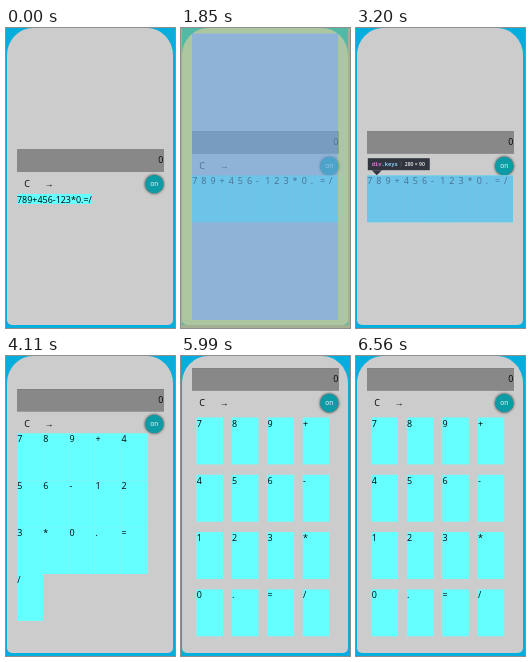
Animation of 169 by 300 pixels, one loop 7.15 s. Source, as an HTML page:

```html
<!DOCTYPE html>
<html lang="en">
<head>
<meta charset="utf-8">
<title>Calculator grid layout</title>
<style>
  html, body { margin: 0; width: 100%; height: 100%; overflow: hidden; background: #05aedd; }
  svg { display: block; width: 100%; height: 100%; }
  text { font: 8.95px "Open Sans", "Noto Sans", sans-serif; fill: #000; white-space: pre; }
  .on { font-size: 6.6px; fill: #fff; text-anchor: middle; }
  .knob { fill: #0d9ca5; filter: drop-shadow(0 0 1.6px #222); }
  .screen { fill: #888; filter: drop-shadow(.5px .9px .6px #444); }
  .key { fill: #6ff; }
  .content { fill: rgba(111, 168, 220, .66); }
  .padding { fill: rgba(147, 196, 125, .55); }
  .margin { fill: rgba(246, 178, 107, .66); }
  .tip { fill: #31353f; }
  .name { font: bold 5.4px "Noto Sans Mono", "DejaVu Sans Mono", monospace; fill: #e673e0; }
  .name tspan { fill: #8ccdf0; }
  .size { font-size: 5.1px; font-weight: 600; fill: #f2f2f2; }
</style>
</head>
<body>
<svg viewBox="0 0 169 300" preserveAspectRatio="none">
  <path fill="#ccc" d="M1 27A26 27 0 0 1 27 0H141A26 27 0 0 1 167 27V292A5 5 0 0 1 162 297H6A5 5 0 0 1 1 292Z"/>
  <g id="head">
    <rect class="screen" x="11" y="0" width="147" height="22"/>
    <text x="157.3" y="13.7" text-anchor="end">0</text>
    <text x="18.3" y="37.7">C</text>
    <text x="38.8" y="37.5">→</text>
    <circle class="knob" cx="148.3" cy="34.6" r="9.2"/>
    <text class="on" x="148.3" y="36.4">on</text>
  </g>
  <g id="keys"></g>
  <g id="overlay"></g>
</svg>
<script>
const LOOP = 7150;
const LABELS = '789+456-123*0.=/';
const LEFT = 11, WIDTH = 146, ROW = 46.9, COL = 26.1;
const $ = id => document.getElementById(id);

const rect = (cls, [x, y, w, h]) =>
  `<rect class="${cls}" x="${x}" y="${y}" width="${w}" height="${h}"/>`;
const label = (s, x, y) => `<text x="${x}" y="${y}">${s}</text>`;

// A run of keys set side by side without any stretching
function run(top, y, h) {
  return { top, html: rect('key', [LEFT, y, 75, h]) + label(LABELS, LEFT, y + 9) };
}

function grid(top, cols, { w = COL, dx = w, dy = ROW, pad = [0, 0], height, size, keysSize }) {
  const y0 = top + 44;
  const cells = [...LABELS].map((_, i) =>
    [LEFT + pad[0] + i % cols * dx, y0 + pad[1] + Math.floor(i / cols) * dy, w, ROW]);
  const html = cells.map(c => rect('key', c)).join('') +
    cells.map(([x, y], i) => label(LABELS[i], x + .2, y + 9)).join('');
  return { top, html, cells, box: [LEFT, y0, WIDTH, height], size, keysSize };
}

const layouts = {
  inline: run(121.5, 166, 10),
  flex: run(103.4, 147.4, ROW),
  spread: grid(103.4, 16, { w: WIDTH / 16, height: ROW, size: '17.5 × 90', keysSize: '280 × 90' }),
  five: grid(33.3, 5, { height: 4 * ROW, size: '50 × 90', keysSize: '280 × 360' }),
  gaps: grid(12.4, 4, {
    w: 26.5, dx: 35.4, dy: 57.3, pad: [4.5, 5.1], height: 229, size: '50 × 90', keysSize: '280 × 440'
  })
};

// time, layout, inspected part (key index, 'keys', 'page' or nothing)
const steps = [
  [0, 'inline'], [330, 'flex'], [990, 'spread'],
  [1850, 'spread', 'page'], [1880, 'spread', 'keys'], [1910, 'spread', 2],
  [2080, 'spread', 1], [2150, 'spread'], [2710, 'spread', 1],
  [2940, 'spread', 0], [3200, 'spread', 'keys'],
  [3560, 'spread', 0], [3620, 'spread', 1], [3690, 'spread', 0], [3750, 'spread'],
  [4110, 'five'], [4240, 'five', 0], [4600, 'five', 1], [4900, 'five', 0], [5000, 'five'],
  [5990, 'gaps'], [6250, 'gaps', 'keys'], [6290, 'gaps', 0], [6340, 'gaps', 1],
  [6380, 'gaps', 2], [6430, 'gaps', 3], [6470, 'gaps', 4], [6520, 'gaps', 5], [6560, 'gaps']
];

function tooltip([bx, by], tag, cls, size) {
  const nameW = (tag + cls).length * 3.25;
  const w = 15 + nameW + size.length * 2.62;
  const x = Math.min(bx + .8, 168 - w), y = by - 17.2;
  const sep = x + 7.4 + nameW;
  return rect('tip', [x, y, w, 12]) +
    `<path class="tip" d="M${x + 4} ${y + 12}h10l-5 5z"/>` +
    `<text class="name" x="${x + 4}" y="${y + 7.8}">${tag}<tspan>${cls}</tspan></text>` +
    `<path d="M${sep} ${y + 3}v6" stroke="#666b75" stroke-width=".5"/>` +
    `<text class="size" x="${x + 11 + nameW}" y="${y + 7.8}">${size}</text>`;
}

function inspect(layout, part) {
  if (part === undefined) return '';
  if (part === 'page') {
    return '<path class="margin" fill-rule="evenodd" d="M0 0H169V300H0ZM1 0V297H167V0Z"/>' +
      '<path class="padding" fill-rule="evenodd" d="M1 0H167V297H1ZM11 5.5V292H157V5.5Z"/>' +
      rect('content', [LEFT, 5.5, WIDTH, 286.5]);
  }
  if (part === 'keys') {
    return rect('content', layout.box) + tooltip(layout.box, 'div', '.keys', layout.keysSize);
  }
  const cell = layout.cells[part];
  return rect('content', cell) + tooltip(cell, 'span', '.key', layout.size);
}

let shown;
function draw(now) {
  const t = now % LOOP;
  const step = steps.findLast(s => s[0] <= t);
  if (step !== shown) {
    const layout = layouts[step[1]];
    if (!shown || shown[1] !== step[1]) {
      $('head').setAttribute('transform', `translate(0 ${layout.top})`);
      $('keys').innerHTML = layout.html;
    }
    $('overlay').innerHTML = inspect(layout, step[2]);
    shown = step;
  }
}

const start = performance.now();
function tick() {
  draw(performance.now() - start);
  requestAnimationFrame(tick);
}
tick();
</script>
</body>
</html>
```
